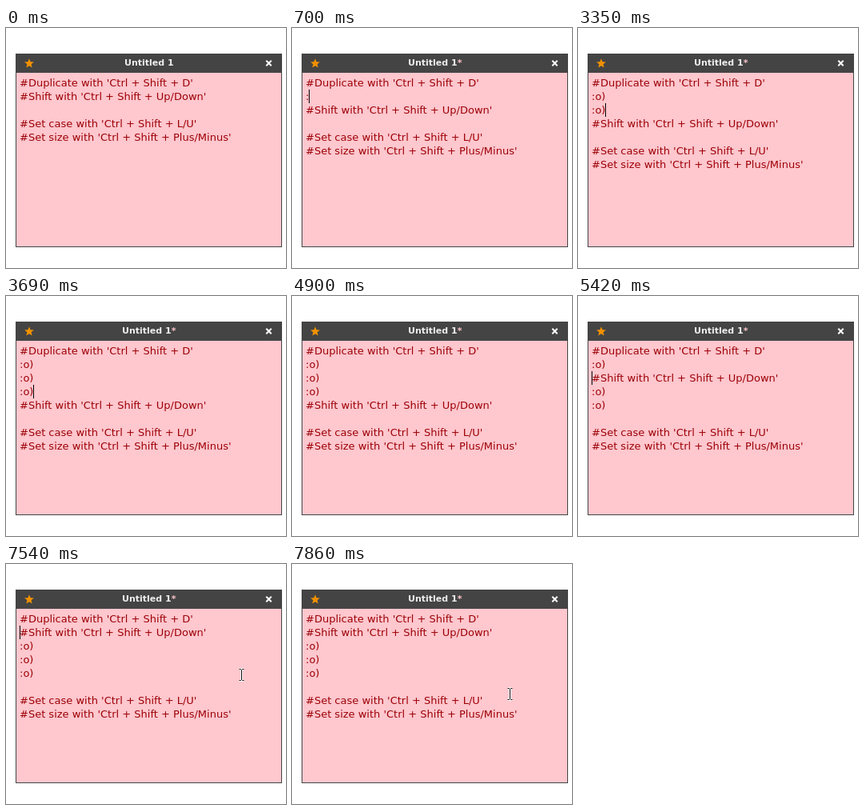
These frames come from a looping animation (350x300 px, 8000 ms). An HTML page:

```html
<!DOCTYPE html>
<html lang="en">
<head>
<meta charset="utf-8">
<title>Sticky note</title>
<style>
  html, body { margin: 0; width: 100%; height: 100%; overflow: hidden; background: #fff; }
  svg { display: block; }
  text { font-family: "DejaVu Sans", sans-serif; }
  #title { font-size: 11px; font-weight: bold; fill: #eee; }
  #note { font-size: 13px; fill: #9c0006; }
</style>
</head>
<body>
<svg width="350" height="300" viewBox="0 0 350 300">
  <rect x="12" y="32" width="333" height="242" fill="#444"/>
  <rect x="13" y="56" width="331" height="217" fill="#ffc7ce"/>
  <path id="star" fill="#f39200"/>
  <text id="title" y="47">Untitled 1<tspan id="dirty" fill="#ffc7ce">*</tspan></text>
  <path d="M325.3 40.8l6.4 6.4m0-6.4l-6.4 6.4" stroke="#fff" stroke-width="2" fill="none"/>
  <g id="note"></g>
  <rect id="caret" width="1" height="17" fill="#000"/>
  <g id="mouse" fill="none">
    <path d="M-3 -7H3M0 -7V7M-3 7H3" stroke="#fff" stroke-width="3" stroke-opacity=".75"/>
    <path d="M-3 -7H-1L0 -6L1 -7H3M0 -6V6M-3 7H-1L0 6L1 7H3" stroke="#111"/>
  </g>
</svg>
<script>
const LOOP = 8000, LEFT = 17, TOP = 60, PITCH = 17;
const el = id => document.getElementById(id);

const phrases = {
  D: "#Duplicate with 'Ctrl + Shift + D'",
  S: "#Shift with 'Ctrl + Shift + Up/Down'",
  C: "#Set case with 'Ctrl + Shift + L/U'",
  Z: "#Set size with 'Ctrl + Shift + Plus/Minus'",
  "-": "", 1: ":", 2: ":o", 3: ":o)"
};

// Key presses: time, rows, caret row, caret x
const keys = [
  [0, "DS-CZ", 1, LEFT],
  [150, "D-S-CZ", 1, LEFT],
  [700, "D1S-CZ", 1, 21],
  [1140, "D2S-CZ", 1, 29],
  [1740, "D3S-CZ", 1, 34],
  [3350, "D33S-CZ", 2, 34],
  [3690, "D333S-CZ", 3, 34],
  [4670, "D333S-CZ", 4, 36],
  [5120, "D33S3-CZ", 3, LEFT],
  [5420, "D3S33-CZ", 2, LEFT],
  [5760, "DS333-CZ", 1, LEFT]
];

// The caret toggles at each blink and reappears on every key press
const blinks = [0, 450, 940, 1430, 1920, 2410, 2910, 3400, 3890, 4390,
  4900, 5380, 5870, 6360, 6860, 7340, 7860];

const starPoints = Array.from({ length: 10 }, (_, i) => {
  const r = i % 2 ? 2.7 : 6.2, a = (i / 5 - 0.5) * Math.PI;
  return (29 + r * Math.cos(a)).toFixed(2) + " " + (44.5 + r * Math.sin(a)).toFixed(2);
});
el("star").setAttribute("d", "M" + starPoints.join("L") + "Z");

const rows = Array.from({ length: 8 }, (_, i) => {
  const row = document.createElementNS("http://www.w3.org/2000/svg", "text");
  row.setAttribute("x", LEFT);
  row.setAttribute("y", TOP + 13 + i * PITCH);
  return el("note").appendChild(row);
});

const show = (node, on) => node.setAttribute("visibility", on ? "visible" : "hidden");

function drawMouse(t) {
  const start = 7340, end = 7860;
  show(el("mouse"), t >= start);
  if (t < start) return;
  const tick = Math.min(end, start + Math.floor((t - start) / 40) * 40);
  const u = (end - tick) / 320;
  const x = Math.round(273 + 22 * u ** 2.5), y = Math.round(162 - 24 * u ** 2);
  el("mouse").setAttribute("transform", `translate(${x - 0.5} ${y + 0.5})`);
}

function draw(t) {
  const [since, doc, line, x] = keys.filter(k => k[0] <= t).pop();
  rows.forEach((row, i) => {
    const s = phrases[doc[i]] || "";
    if (row.textContent !== s) row.textContent = s;
  });
  const edited = t >= 150;
  el("title").setAttribute("x", edited ? 145 : 148);
  el("dirty").setAttribute("display", edited ? "inline" : "none");

  const toggles = blinks.filter(b => b >= since && b <= t).length;
  show(el("caret"), toggles % 2 === 0);
  el("caret").setAttribute("x", x);
  el("caret").setAttribute("y", TOP + line * PITCH);
  drawMouse(t);
}

const begin = performance.now();
function loop() {
  draw((performance.now() - begin) % LOOP);
  requestAnimationFrame(loop);
}
loop();
</script>
</body>
</html>
```
